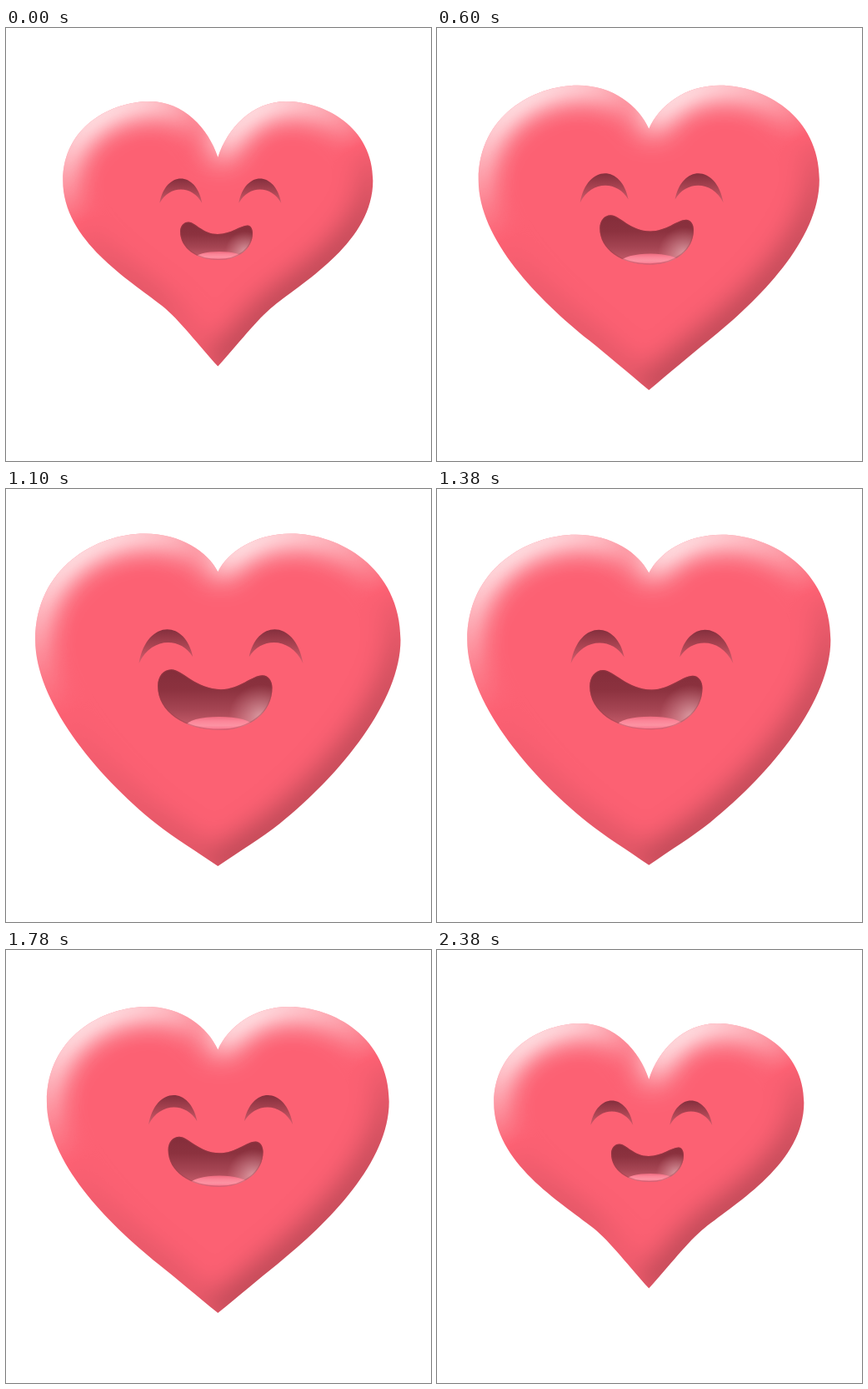
Recreate the animation shown at these times as an HTML page with a canvas. Size 510 px wide and 519 px high, loop 2400 ms.

```html
<!DOCTYPE html>
<html lang="en">
<head>
<meta charset="utf-8">
<title>Happy heart</title>
<style>
  html, body { margin: 0; width: 100%; height: 100%; overflow: hidden; background: #fff; }
  canvas { display: block; }
</style>
</head>
<body>
<canvas id="stage" width="510" height="519"></canvas>
<script>
const W = 510, H = 519, LOOP = 2400, AXIS = 254.3;
const ctx = document.getElementById('stage').getContext('2d');

const mix = (a, b, p) => a + (b - a) * p;
const lead = (p, k) => p + k * p * (1 - p);

function layer() {
  const canvas = document.createElement('canvas');
  canvas.width = W;
  canvas.height = H;
  return canvas.getContext('2d', { willReadFrequently: true });
}
const mask = layer(), relief = layer();
const reliefData = relief.createImageData(W, H);

// One side of the heart; dir is -1 for left, 1 for right.
function heartSide(dir, p) {
  const lobe = lead(p, 0.2), spine = lead(p, 0.42);
  const notch = mix(155, 98.5, spine), tip = mix(405.5, 452.5, spine);
  const topX = mix(82, 88, lobe), topY = mix(88, 53, lobe);
  const sideX = mix(186, 219.7, lobe), sideY = mix(183, 181, lobe);
  const waistX = mix(67, 74, spine), waistY = mix(333, 402, spine);
  const reach = mix(39, 75, spine), slope = 0.8;

  const path = new Path2D();
  const curve = (x1, y1, x2, y2, x, y) =>
    path.bezierCurveTo(AXIS + dir * x1, y1, AXIS + dir * x2, y2, AXIS + dir * x, y);
  path.moveTo(AXIS, notch);
  curve(topX * 0.14, mix(notch, topY, 0.52), topX * 0.5, topY, topX, topY);
  curve(mix(topX, sideX, 0.44), topY, sideX, mix(sideY, topY, 0.68), sideX, sideY);
  curve(sideX, sideY + 72, waistX + reach, waistY - reach * slope, waistX, waistY);
  curve(waistX - 21, waistY + 21 * slope, waistX * 0.35, mix(tip, waistY, 0.35), 0, tip);
  path.closePath();
  return path;
}

function heartPath(p) {
  const heart = heartSide(-1, p);
  heart.addPath(heartSide(1, p));
  // A narrow strip hides the seam between the halves.
  const spine = lead(p, 0.42), top = mix(155, 98.5, spine) + 2;
  heart.rect(AXIS + 0.5, top, -1, mix(405.5, 452.5, spine) - 2 - top);
  heart.rect(AXIS - 0.5, top, 1, mix(405.5, 452.5, spine) - 2 - top);
  return heart;
}

// Soft bevel: slope of the blurred silhouette along the light direction.
function drawRelief(heart) {
  const sigma = 18, dx = 4, dy = 7;
  mask.clearRect(0, 0, W, H);
  mask.save();
  mask.shadowColor = '#000';
  mask.shadowBlur = sigma * 2;
  mask.shadowOffsetX = 2 * W;
  mask.translate(-2 * W, 0);
  mask.fill(heart);
  mask.restore();

  const src = mask.getImageData(0, 0, W, H).data;
  const out = reliefData.data;
  const step = (dy * W + dx) * 4;
  const peak = 255 * 2 * Math.hypot(dx, dy) / (sigma * Math.sqrt(2 * Math.PI));
  for (let y = 20; y < 490; y++) {
    for (let x = 20; x < 490; x++) {
      const i = (y * W + x) * 4;
      const light = (src[i + 3 + step] - src[i + 3 - step]) / peak;
      out[i] = out[i + 1] = out[i + 2] = light > 0 ? 255 : 0;
      out[i + 3] = 255 * (light > 0 ? 0.76 * light : -0.2 * light);
    }
  }
  relief.putImageData(reliefData, 0, 0);
  ctx.save();
  ctx.clip(heart);
  ctx.drawImage(relief.canvas, 0, 0);
  ctx.restore();
}

function gradient(y0, y1, ...colors) {
  const g = ctx.createLinearGradient(0, y0, 0, y1);
  colors.forEach((c, i) => g.addColorStop(i / (colors.length - 1), c));
  return g;
}

function drawEye(dir, p) {
  const centre = mix(257.3, 258, p);
  const x0 = centre + dir * mix(73, 99, p), y0 = mix(210, 209, p);
  const x1 = centre + dir * mix(22, 34, p), y1 = mix(210, 201, p);
  const peak = mix(180.5, 168, p), lid = mix(13, 16, p);
  const base = (y0 + y1) / 2, w = x1 - x0;
  const arch = (y, inset, x, endY, side) => ctx.bezierCurveTo(
    x - side * w * (1 - inset), base - (base - y) / 0.75,
    x - side * w * inset, base - (base - y) / 0.75, x, endY);
  ctx.beginPath();
  ctx.moveTo(x0, y0);
  arch(peak, 0.14, x1, y1, 1);
  arch(peak + lid, 0.23, x0, y0, -1);
  ctx.fillStyle = gradient(peak, base, '#842f3d', '#a84351', '#cf5a69');
  ctx.fill();
}

function mouthPath(p) {
  const point = (x0, y0, x1, y1) => [mix(x0, x1, p), mix(y0, y1, p)];
  const cheekL = point(219, 232.5, 198, 216), cheekR = point(290, 236.5, 308, 223);
  const left = point(209, 244, 181.5, 236), right = point(296, 246, 320, 238);
  const dip = point(254, 247, 258, 240), bottom = point(255, 278, 257, 289);

  const path = new Path2D();
  let [x, y] = cheekL;
  path.moveTo(x, y);
  const go = (to, c1, c2) => {
    path.bezierCurveTo(...c1, ...c2, ...to);
    [x, y] = to;
  };
  const wave = (to, a, b) => go(to, [mix(x, to[0], a), y], [mix(to[0], x, b), to[1]]);
  const fromFlat = to => go(to, [mix(x, to[0], 0.58), y], [to[0], mix(to[1], y, 0.58)]);
  const fromSteep = to => go(to, [x, mix(y, to[1], 0.58)], [mix(to[0], x, 0.58), to[1]]);
  wave(dip, 0.22, 0.5);
  wave(cheekR, 0.45, 0.25);
  fromFlat(right);
  fromSteep(bottom);
  fromFlat(left);
  fromSteep(cheekL);
  return { path, top: cheekL[1], bottom: bottom[1], right: right[0], width: right[0] - left[0] };
}

function drawMouth(p) {
  const { path, top, bottom, right, width } = mouthPath(p);
  ctx.save();
  ctx.clip(path);
  ctx.fillStyle = gradient(top, bottom, '#842d3a', '#8c323f', '#a54553', '#cc6270');
  ctx.fillRect(0, 0, W, H);

  const gx = right - width * 0.1, gy = mix(top, bottom, 0.78);
  const glow = ctx.createRadialGradient(gx, gy, 0, gx, gy, width * 0.28);
  glow.addColorStop(0, 'rgba(245,205,208,.6)');
  glow.addColorStop(1, 'rgba(245,170,180,0)');
  ctx.fillStyle = glow;
  ctx.fillRect(0, 0, W, H);

  const ty = mix(276, 284, p), rx = mix(29, 40, p), ry = mix(8, 11, p);
  ctx.beginPath();
  ctx.ellipse(256, ty, rx, ry, 0, 0, 2 * Math.PI);
  ctx.fillStyle = gradient(ty - ry, bottom, '#ee6c80', '#fb8598', '#fc93a3', '#f9718a');
  ctx.fill();

  ctx.strokeStyle = 'rgba(160,58,72,.4)';
  ctx.lineWidth = 2.5;
  ctx.stroke(path);
  ctx.restore();
}

function draw(time) {
  const t = Math.floor((time % LOOP) / 20) * 20;
  const x = 1 - Math.abs(t / (LOOP / 2) - 1);
  const p = x * x * (3 - 2 * x);
  const heart = heartPath(p);
  ctx.fillStyle = '#fff';
  ctx.fillRect(0, 0, W, H);
  ctx.fillStyle = '#fc6173';
  ctx.fill(heart);
  drawRelief(heart);
  drawEye(-1, p);
  drawEye(1, p);
  drawMouth(p);
}

let start;
function frame() {
  const now = performance.now();
  start ??= now;
  draw(now - start);
  requestAnimationFrame(frame);
}
frame();
</script>
</body>
</html>
```
